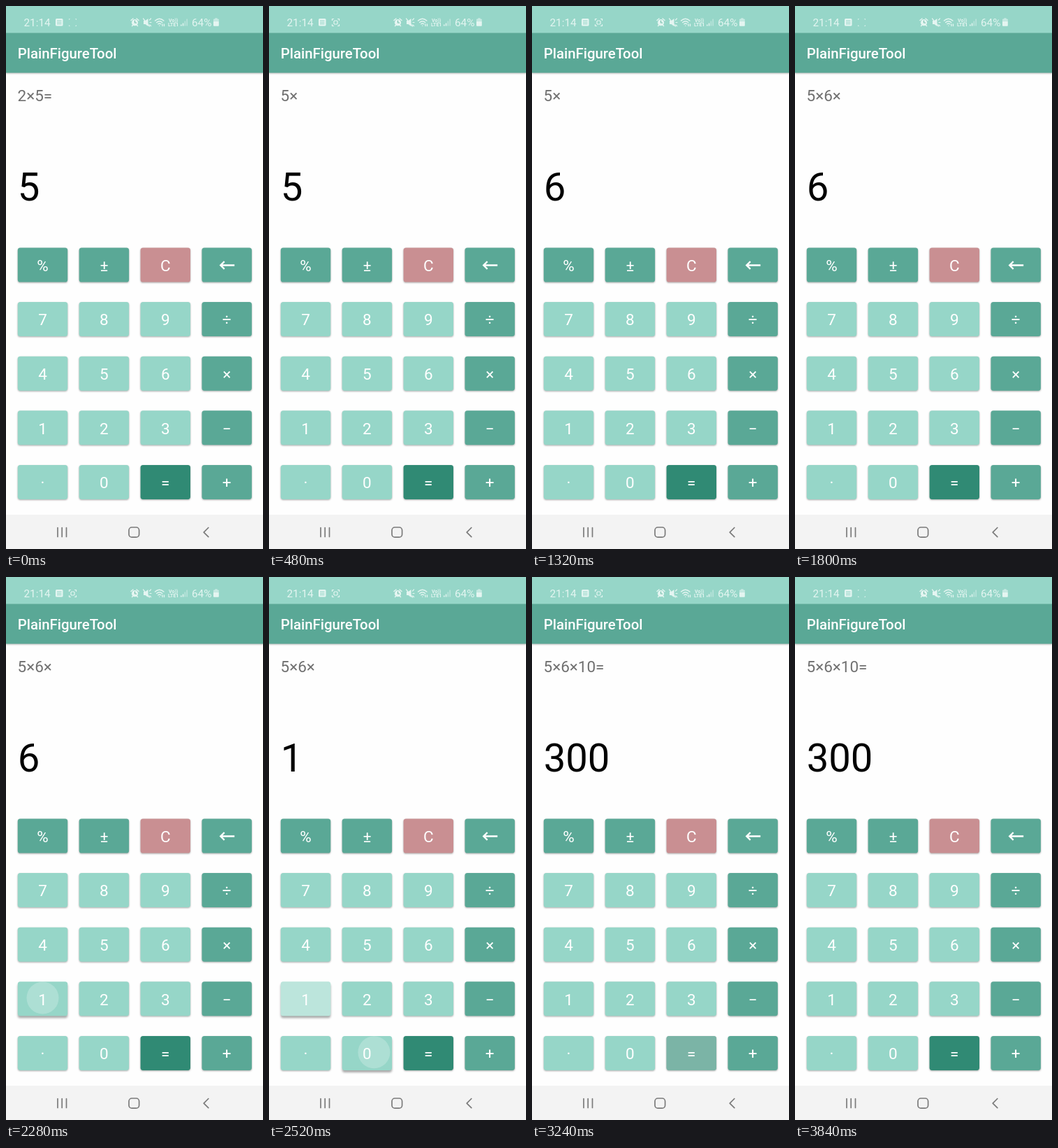
Write an HTML page that moves like this. It is 368x776 px and loops after 3960 ms.

```html
<!DOCTYPE html>
<html lang="en">
<head>
<meta charset="utf-8">
<title>Calculator</title>
<style>
  html, body { margin: 0; width: 100%; height: 100%; overflow: hidden; background: #fefefe; }
  svg { display: block; width: 368px; height: 776px; font-family: Roboto, sans-serif; }
  .key { filter: drop-shadow(0 1.2px .9px #0005); }
  .key.lifted { filter: drop-shadow(0 3px 1.7px #0005); }
  .label { font-size: 22.5px; fill: #fff; text-anchor: middle; }
  .line { fill: none; stroke-linecap: round; stroke-linejoin: round; }
</style>
</head>
<body>
<svg viewBox="0 0 368 776">
  <rect width="368" height="776" fill="#fefefe"/>
  <rect y="38" width="368" height="57.5" fill="#5aa896" style="filter:drop-shadow(0 1px 1px #0004)"/>
  <rect width="368" height="38.5" fill="#96d6c8"/>

  <g id="status" fill="#e4f5f1" stroke="none" font-size="15.3">
    <text x="25.5" y="28.7">21:14</text>
    <text x="266" y="28.7">64%</text>
    <rect x="71" y="18" width="10.5" height="10.5" rx="1.5"/>
    <path d="M73 21h6.5M73 23.3h6.5M73 25.6h6.5" stroke="#96d6c8"/>
    <g class="line" stroke="#e4f5f1" stroke-width="1.2">
      <path id="corners"/>
      <rect id="lens" x="93" y="21" width="5" height="5" rx="1"/>
    </g>
    <circle cx="184.5" cy="23.7" r="4.6"/>
    <path class="line" d="M179 20.5l3-2.5M190 20.5l-3-2.5M180.5 28.5l1-1M188.5 28.5l-1-1" stroke="#e4f5f1" stroke-width="1.5"/>
    <path class="line" d="M184.5 21v3h2.2" stroke="#78bfae" stroke-width="1.2"/>
    <path d="M197 21h2.5l4-3v11l-4-3h-2.5z"/>
    <path class="line" d="M196.5 18l9 11M205.5 20l2-2M206 23.5h2M205.8 27l1.8 1.5" stroke="#e4f5f1" stroke-width="1.2"/>
    <g class="line" stroke="#e4f5f1" stroke-width="1.4">
      <path d="M213.5 21q6.2-5.5 12.4 0M215.7 23.5q4-3.5 8 0M217.8 25.8q2-1.6 4 0"/>
      <path d="M219.7 28.2h.1M224 26v2.5M226.5 28.5v-2.5" stroke-width="1.3"/>
    </g>
    <text x="233" y="22.5" font-size="7" font-weight="700">Vo))</text>
    <text x="232" y="29" font-size="7" font-weight="700">LTE1</text>
    <path d="M250 28.5v-2h1.5v2zM252.8 28.5v-4h1.5v4z"/>
    <path d="M255.6 28.5v-7h1.5v7zM258.4 28.5v-10h1.5v10z" opacity=".5"/>
    <path d="M297 21v-1.5q0-1 1-1h1.3v-1.3h3.2v1.3h1.3q1 0 1 1V21z" opacity=".65"/>
    <path d="M297 21.5h7.8v6.3q0 1-1 1h-5.8q-1 0-1-1z"/>
  </g>

  <text x="16.7" y="75" font-size="20.4" font-weight="500" fill="#fff">PlainFigureTool</text>
  <text id="formula" x="16.5" y="136.2" font-size="22.5" fill="#707070"></text>
  <text id="result" x="16.7" y="278" font-size="56.2" fill="#000"></text>
  <g id="keys"></g>

  <rect y="727" width="368" height="49" fill="#f3f3f3"/>
  <g class="line" stroke="#7b7b7b" stroke-width="1.7">
    <path d="M74 745.5v13M80.2 745.5v13M86.5 745.5v13M289.8 745.5l-6.6 6.6 6.6 6.6"/>
    <rect x="176" y="745" width="14.6" height="14.2" rx="4.2"/>
  </g>
</svg>
<script>
const TICK = 120, LOOP = 3960;
const $ = id => document.getElementById(id);
const LIGHT = '#96d6c8', DARK = '#5aa896', ROSE = '#c98f92', DEEP = '#308a74';
const W = 71.4, H = 49;
const labels = '%±C←789÷456×123−·0=+';

const keyX = i => 16.8 + i % 4 * 87.9;
const keyY = i => 345.5 + Math.floor(i / 4) * 77.6;
const color = c => c === 'C' ? ROSE : c === '=' ? DEEP : /[0-9·]/.test(c) ? LIGHT : DARK;

$('keys').innerHTML = [...labels].map((c, i) => {
  const x = keyX(i), y = keyY(i), cx = x + W / 2;
  const box = `x="${x}" y="${y}" width="${W}" height="${H}" rx="3.6"`;
  const label = c === '←'
    ? `<path class="line" d="M${cx + 11} ${y + 25}h-20m5.5-5.3l-5.5 5.3 5.5 5.3" stroke="#fff" stroke-width="2.3" style="stroke-linecap:butt;stroke-linejoin:miter"/>`
    : `<text class="label" x="${cx}" y="${y + 33.3}">${c}</text>`;
  return `<g><rect class="key" ${box} fill="${color(c)}"/>
    <circle r="23" fill="#fff" opacity="0"/><rect class="glow" ${box} fill="#fff" opacity="0"/>${label}</g>`;
}).join('');
const keys = [...$('keys').children];

// Each press: key, start time, ripple phase per tick, touch offset, raised shadow
const presses = [
  ['×', 120, '123'],
  ['6', 960, '123'],
  ['×', 1560, '13'],
  ['1', 2280, '1223', 0, true],
  ['0', 2520, '123', 10, true],
  ['=', 3120, '123'],
];

// Display contents from each time on
const display = [
  [0, '2×5=', '5'], [240, '5×', '5'], [1080, '5×', '6'], [1680, '5×6×', '6'],
  [2400, '5×6×', '1'], [2640, '5×6×', '10'], [3240, '5×6×10=', '300'],
];

// Times at which the capture icon toggles, starting dim
const blinks = [480, 960, 1320, 1800, 2280, 2760, 3120, 3600];

function drawIcon(t) {
  const on = blinks.filter(b => b <= t).length % 2;
  const n = on ? 2 : .7;
  $('corners').setAttribute('d',
    `M90.5 ${18.5 + n}v${-n}h${n}M${100.5 - n} 18.5h${n}v${n}M100.5 ${28.5 - n}v${n}h${-n}M${90.5 + n} 28.5h${-n}v${-n}`);
  $('corners').setAttribute('opacity', on ? 1 : .75);
  $('lens').setAttribute('opacity', on);
}

function drawKeys(t) {
  keys.forEach((g, i) => {
    const [key, circle, glow] = g.children;
    const press = presses.find(([c, start, phases]) =>
      c === labels[i] && t >= start && t < start + phases.length * TICK);
    const [, start = 0, phases = '', dx = 0, raised = false] = press || [];
    const phase = +phases[(t - start) / TICK] || 0;
    key.classList.toggle('lifted', raised && phase > 0);
    circle.setAttribute('cx', keyX(i) + W / 2 + dx);
    circle.setAttribute('cy', keyY(i) + 23.3);
    circle.setAttribute('opacity', phase === 1 ? .22 : 0);
    glow.setAttribute('opacity', [0, 0, .36, .14][phase]);
  });
}

let last = -1;
function frame() {
  const t = Math.floor(performance.now() % LOOP / TICK) * TICK;
  if (t !== last) {
    const [, formula, result] = display.filter(d => d[0] <= t).pop();
    $('formula').textContent = formula;
    $('result').textContent = result;
    drawIcon(t);
    drawKeys(t);
    last = t;
  }
  requestAnimationFrame(frame);
}
frame();
</script>
</body>
</html>
```
